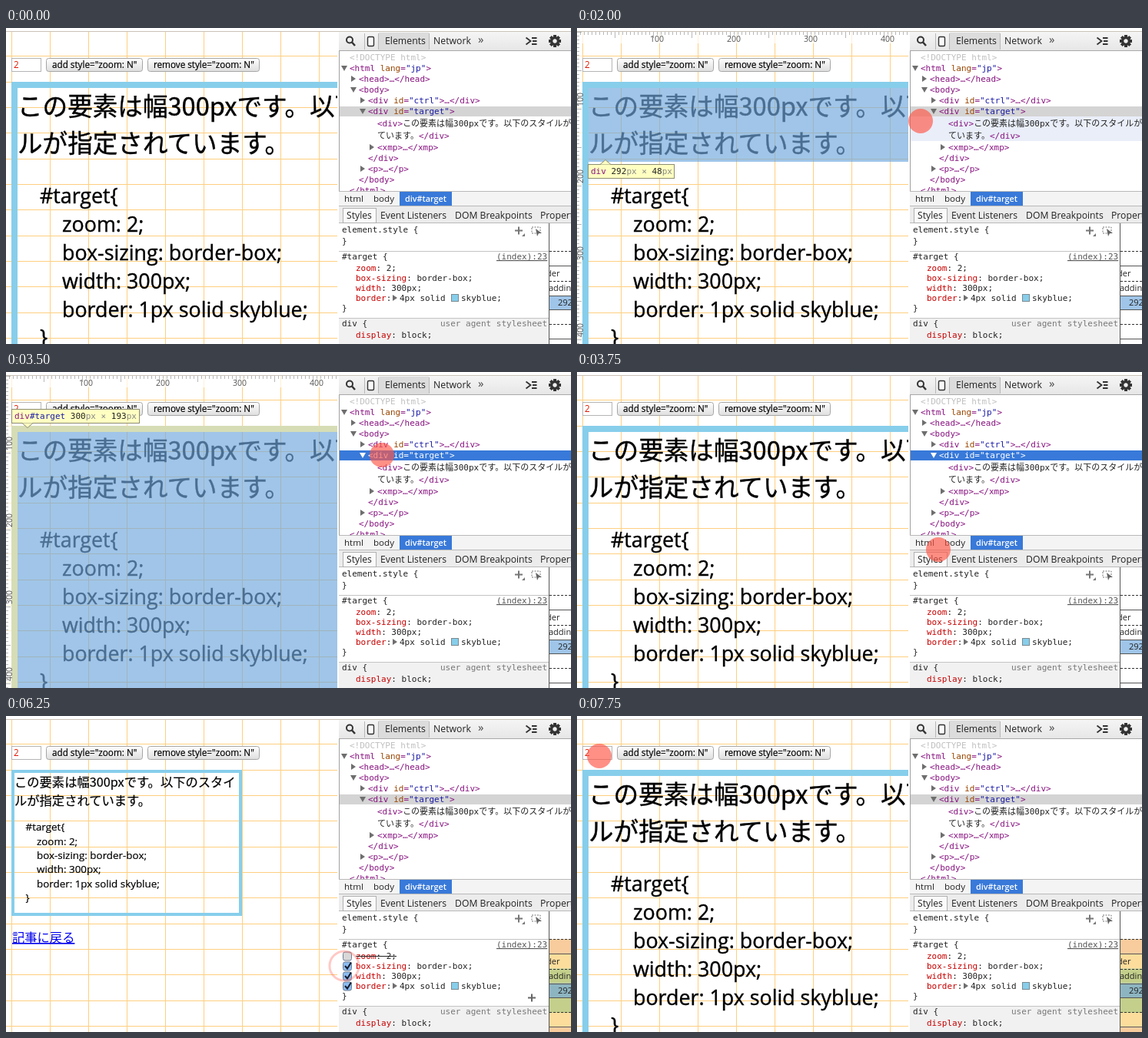
An HTML page that plays this animation: 735 px wide and 411 px high, repeating every 8000 ms.

```html
<!DOCTYPE html>
<html lang="en">
<head>
<meta charset="utf-8">
<title>Zoom inspector</title>
<style>
html, body { margin: 0; width: 100%; height: 100%; overflow: hidden; background: #fff; }
svg { display: block; }
text { white-space: pre; }
.ui { font-family: "Open Sans", "Noto Sans", sans-serif; }
.mono { font: 11px "DejaVu Sans Mono", "Noto Sans CJK JP", monospace; }
.jp { font: 16.3px "Noto Sans CJK JP", "Noto Sans CJK", sans-serif; }
#target text { stroke: #000; stroke-width: .2; }
</style>
</head>
<body>
<svg id="stage" width="735" height="411" viewBox="0 0 735 411"></svg>
<script>
const PURPLE = '#881280', BROWN = '#994500', NAVY = '#1a1aa6', RED = '#c80000', INK = '#222';
const range = (n, fn) => Array.from({ length: n }, (_, i) => fn(i)).join('');
const esc = s => s.replace(/&/g, '&amp;').replace(/</g, '&lt;').replace(/>/g, '&gt;');
const rect = (x, y, w, h, fill, more = '') =>
  `<rect x="${x}" y="${y}" width="${w}" height="${h}" fill="${fill}" ${more}/>`;
const path = (d, stroke, more = '') => `<path d="${d}" fill="none" stroke="${stroke}" ${more}/>`;
const text = (cls, x, y, s, fill = '#000', size = 0, more = '') =>
  `<text class="${cls}" x="${x}" y="${y}" fill="${fill}" ${size ? `font-size="${size}"` : ''} ${more}>${esc(s)}</text>`;
const runs = (x, y, parts) => `<text class="mono" x="${x}" y="${y}">` +
  parts.map(([s, c]) => `<tspan fill="${c}">${esc(s)}</tspan>`).join('') + '</text>';
const group = (id, body, more = '') => `<g id="${id}" ${more}>${body}</g>`;

// Syntax colours for one line of markup
const markup = (x, y, s) => runs(x, y, s.split(/(\w+(?==))|("\w+")/).filter(Boolean).map(p =>
  [p, p[0] === '"' ? NAVY : /^\w+$/.test(p) ? BROWN : PURPLE]));
const arrow = (x, y, open, fill = '#6e6e6e') =>
  `<path d="M${x} ${y}${open ? 'm-4 -3h8l-4 7z' : 'm-3 -4v8l6 -4z'}" fill="${fill}"/>`;

function button(x, w, label) {
  return rect(x + .5, 39.5, w - 1, 17, 'url(#shine)', 'rx="3" stroke="#a6a6a6"') +
    text('ui', x + 8, 52, label, '#000', 11.7, 'stroke="#000" stroke-width=".2"');
}

function page() {
  const grid = range(9, i => `M${7.5 + i * 50} 5V411`) +
    range(13, i => `M0 ${Math.round(3 + i * 33.33) + .5}H431`);
  const code = ['zoom: 2;', 'box-sizing: border-box;', 'width: 300px;', 'border: 1px solid skyblue;'];
  const target = rect(2, 2, 296, 186, 'none', 'stroke="skyblue" stroke-width="4"') +
    text('jp', 4, 22, 'この要素は幅300pxです。以下のスタイ') + text('jp', 4, 46, 'ルが指定されています。') +
    text('ui', 18.5, 79.2, '#target{', '#000', 13.4) +
    code.map((s, i) => text('ui', 33, 97.6 + i * 18.4, s, '#000', 13.4)).join('') +
    text('ui', 18.5, 171, '}', '#000', 13.4);
  return path(grid, '#ffcf80') +
    rect(7.5, 39.5, 38, 17, '#fff', 'stroke="#b5b5b5"') + text('ui', 10, 52, '2', '#e01800', 11.7) +
    button(52, 126, 'add style="zoom: N"') + button(184, 146, 'remove style="zoom: N"') +
    group('target', target) +
    group('link', text('jp', 8, 294, '記事に戻る', '#00e', 0, 'text-decoration="underline"'));
}

function rulers() {
  const ticks = range(87, i => `M${i * 5 - .5} 5v${i % 10 ? 4 : 8}`) +
    range(82, i => `M0 ${5.5 + i * 5}h${i % 10 ? 3 : 6}`);
  return rect(0, 5, 431, 15, '#fff', 'opacity=".7"') + rect(0, 20, 7, 391, '#fff', 'opacity=".7"') +
    path(ticks, '#999', 'stroke-width=".7"') +
    range(4, i => {
      const at = 100 * (i + 1);
      return text('ui', at - 5, 18, '' + at, '#555', 10.5) +
        text('ui', 0, 0, '' + at, '#555', 10.5, `transform="translate(8 ${at + 2}) rotate(-90)"`);
    });
}

function tip(x, y, w, arrowPath, parts) {
  return rect(x + .5, y + .5, w, 18, '#ffffc2', 'stroke="#8c8c70"') +
    `<path d="${arrowPath}" fill="#ffffc2" stroke="#8c8c70"/>` + runs(x + 4, y + 13, parts);
}
const size = (w, h) => [[' ' + w, INK], ['px', '#888'], [' × ', '#888'], ['' + h, INK], ['px', '#888']];
const BLUE_VEIL = 'rgba(111,168,220,.66)', GOLD_VEIL = 'rgba(255,229,153,.66)';

function overlays() {
  return group('inner', rect(15, 78, 416, 96, BLUE_VEIL)) +
    group('outer', rect(7, 70, 424, 8, GOLD_VEIL) + rect(7, 78, 8, 333, GOLD_VEIL) + rect(15, 78, 416, 333, BLUE_VEIL)) +
    group('rulers', rulers()) +
    group('innerTip', tip(14, 177, 112, 'M30 177.5l7 -6l7 6', [['div', PURPLE], ...size(292, 48)])) +
    group('outerTip', tip(7, 48, 166, 'M21 66.5l7 6l7 -6', [['div', PURPLE], ['#target', NAVY], ...size(300, 193)]));
}

function toolbar() {
  const gear = range(8, i => `<rect x="-2" y="-8" width="4" height="5" fill="#333" transform="rotate(${i * 45})"/>`);
  return rect(433, 5, 302, 25, 'url(#bar)') + rect(485, 6, 65, 23, '#dcdcdc') +
    path('M466.5 7V28M484.5 7V28M550.5 7V28', '#b8b8b8') +
    '<circle cx="447" cy="15.5" r="4" fill="none" stroke="#333" stroke-width="2"/>' +
    path('M450 18.5l4 4.5', '#333', 'stroke-width="2.5"') +
    rect(470.5, 11.5, 8, 12, '#f8f8f8', 'rx="1.5" stroke="#333" stroke-width="1.4"') +
    text('ui', 493, 21, 'Elements', INK, 12.3) + text('ui', 556, 21, 'Network', INK, 12.3) +
    text('ui', 614, 20, '»', '#444', 15) +
    path('M676.5 12.5l6 4.5l-6 4.5M684 13h6.5M685 17h5.5M684 21h6.5', '#333', 'stroke-width="1.8"') +
    `<g transform="translate(714 17)">${gear}<circle r="4.4" fill="none" stroke="#333" stroke-width="3.4"/></g>` +
    path('M433 29.5H735', '#a9a9a9');
}

function tree() {
  const tag = '<div id="target">';
  return text('mono', 447, 42, '<!DOCTYPE html>', '#c0c0c0') +
    group('rowHover', rect(434, 115, 301, 32, '#e9eef9')) +
    group('rowIdle', rect(434, 102, 301, 13, '#d4d4d4') + arrow(464, 108, true) + markup(471, 112, tag)) +
    group('rowActive', rect(434, 102, 301, 13, '#3879d9') + arrow(464, 108, true, '#fff') + text('mono', 471, 112, tag, '#fff')) +
    [[447, 56, '<html lang="jp">', 1], [459, 70, '<head>…</head>', 0], [459, 84, '<body>', 1],
     [471, 98, '<div id="ctrl">…</div>', 0], [483, 159, '<xmp>…</xmp>', 0], [471, 187, '<p>…</p>', 0]]
      .map(([x, y, s, open]) => arrow(x - 7, y - 4, open) + markup(x, y, s)).join('') +
    runs(483, 128, [['<div>', PURPLE], ['この要素は幅300pxです。以下のスタイルが指定され', INK]]) +
    runs(483, 144, [['ています。', INK], ['</div>', PURPLE]]) +
    markup(471, 173, '</div>') + markup(459, 201, '</body>') + markup(447, 215, '</html>');
}

function bars() {
  return rect(433, 212, 302, 20, '#f4f4f4') + path('M433 212.5H735M433 231.5H735', '#b9b9b9') +
    rect(512, 213, 68, 18, '#3879d9') +
    text('ui', 440, 226, 'html', INK, 11.6) + text('ui', 478, 226, 'body', INK, 11.6) +
    text('ui', 519, 226, 'div#target', '#fff', 10.8, 'font-weight="600"') +
    rect(433, 232, 302, 22, '#ececec') + path('M433 253.5H735', '#b9b9b9') +
    rect(438.5, 234.5, 43, 19, '#fafafa', 'stroke="#b0b0b0"') +
    [[443, 'Styles'], [487, 'Event Listeners'], [584, 'DOM Breakpoints'], [695, 'Properties']]
      .map(([x, s]) => text('ui', x, 248, s, INK, 12.2)).join('');
}

const check = (i, on) => rect(438.5, 307 + i * 13, 11, 11, on ? '#8cbcf0' : '#d8d8d8', 'rx="2.5" stroke="#6f7f94"') +
  (on ? path(`M441 ${312 + i * 13}l3 3.5l5 -8`, '#151c2c', 'stroke-width="2"') : '');

function styles() {
  const props = [['zoom', '2;'], ['box-sizing', 'border-box;'], ['width', '300px;']];
  const mono = (x, y, s, c = INK, more) => text('mono', x, y, s, c, 0, more);
  return rect(433, 254, 273, 157, '#fff') + rect(433, 378, 273, 33, '#f1f1f1') +
    path('M433 290.5H706M433 377.5H706', '#c4c4c4') +
    mono(437, 266, 'element.style {') + mono(437, 281, '}') +
    path('M662 263.5h10M667 258.5v10', '#777', 'stroke-width="2"') + '<path d="M675 267v4h-4z" fill="#777"/>' +
    rect(684, 259, 11, 8, 'none', 'stroke="#777" stroke-dasharray="2 1.5"') + '<path d="M689 261l8 6l-4 0l-2 4z" fill="#666"/>' +
    mono(437, 301, '#target {') + mono(638, 301, '(index):23', '#555', 'text-decoration="underline"') +
    props.map(([k, v], i) => runs(455, 316 + i * 13, [[k, RED], [': ' + v, INK]])).join('') +
    runs(455, 355, [['border', RED], [':', INK]]) + arrow(506, 351, false) + mono(512, 355, '4px solid') +
    rect(579.5, 346.5, 9, 9, 'skyblue', 'stroke="#7a8a90"') + mono(592, 355, 'skyblue;') + mono(437, 368, '}') +
    group('struck', path('M455 312.5H508', '#222')) +
    group('checks', group('zoomOn', check(0, true)) + group('zoomOff', check(0, false)) +
      range(3, i => check(i + 1, true)) + path('M679 366.5h10M684 361.5v10', '#666', 'stroke-width="2"')) +
    mono(437, 388, 'div {') + mono(565, 388, 'user agent stylesheet', '#777') +
    runs(455, 403, [['display', RED], [': block;', INK]]);
}

function boxModel() {
  const bands = ['#f9cc9d', '#fddd9b', '#c3cf8b', '#8db5c1', '#c3cf8b', '#fddd9b', '#f9cc9d'];
  return rect(706, 254, 29, 157, '#fff') + rect(707, 348, 28, 18, '#9fc5e8') +
    group('bands', bands.map((c, i) => rect(707, 290 + i * 19.2, 28, 19.3, c)).join('')) +
    path('M707 290.5H735M707 329.5H735M707 385.5H735', '#333', 'stroke-dasharray="3 2"') +
    path('M707 309.5H735M707 348.5H735M707 366.5H735M707 404.5H735', '#555') +
    text('ui', 703, 323, 'der', INK, 11) + text('ui', 706, 342, 'adding', INK, 11) +
    text('ui', 718, 361, '292', INK, 11) + rect(700, 310, 6, 18, '#fff') + path('M706.5 254V411', '#555');
}

document.getElementById('stage').innerHTML = `<defs>
  <linearGradient id="shine" x2="0" y2="1"><stop stop-color="#fff"/><stop offset="1" stop-color="#dedede"/></linearGradient>
  <linearGradient id="bar" x2="0" y2="1"><stop stop-color="#f5f5f5"/><stop offset="1" stop-color="#e6e6e6"/></linearGradient>
  <clipPath id="view"><rect y="5" width="431" height="406"/></clipPath></defs>` +
  rect(0, 0, 735, 411, '#fff') +
  group('page', page() + overlays(), 'clip-path="url(#view)"') +
  rect(431, 5, 2, 406, '#fff') + path('M433.5 5V411', '#a0a0a0') +
  tree() + toolbar() + bars() + styles() + boxModel() + path('M0 4.5H735', '#c9c2b8') +
  '<circle id="disc" r="16" fill="#ff5747" opacity=".66"/>' +
  '<circle id="ring" fill="none" stroke="#ff6a60" stroke-width="3"/>';

const $ = Object.fromEntries([...document.querySelectorAll('#stage [id]')].map(n => [n.id, n]));

// Each step changes only what it names; ring is the opacity of a pressed pointer
const steps = [
  [0, { at: null, ring: 0, hover: '', active: false, zoom: 2, checks: false, bands: false }],
  [250, { at: [24, 16] }], [500, { at: [110, 50] }], [750, { at: [230, 92] }],
  [1000, { at: [340, 135] }], [1250, { at: [412, 162] }],
  [1500, { at: [443, 135], hover: 'inner' }], [1750, { at: [446, 125] }], [2000, { at: [447, 121] }],
  [2250, { at: [489, 108], hover: 'outer' }],
  [2750, { ring: .4, active: true }], [3000, { ring: .2 }], [3250, { ring: 0 }],
  [3750, { at: [470, 231], hover: '' }], [4000, { at: [456, 274] }],
  [4250, { at: [443, 316], checks: true }], [4500, { at: [440, 325] }],
  [5000, { ring: .4, active: false }], [5250, { ring: .22 }],
  [5500, { ring: 0, zoom: 1, bands: true }],
  [6250, { ring: .36 }], [6500, { ring: .2 }], [6750, { ring: 0, zoom: 2 }],
  [7250, { at: [330, 262], checks: false }], [7500, { at: [130, 128] }], [7750, { at: [29, 52] }]
];

const show = (id, on) => { $[id].style.display = on ? '' : 'none'; };

function draw(time) {
  const s = Object.assign({}, ...steps.filter(([t]) => t <= time).map(([, change]) => change));
  const zoomed = s.zoom === 2;
  $.target.setAttribute('transform', `translate(7 70) scale(${s.zoom})`);
  for (const id of ['inner', 'outer']) { show(id, s.hover === id); show(id + 'Tip', s.hover === id); }
  show('rulers', s.hover);
  show('rowHover', s.hover === 'inner');
  show('rowIdle', !s.active);
  show('rowActive', s.active);
  show('link', !zoomed);
  show('struck', !zoomed);
  show('zoomOn', zoomed);
  show('zoomOff', !zoomed);
  show('checks', s.checks);
  show('bands', s.bands);
  show('disc', s.at && !s.ring);
  show('ring', s.at && s.ring);
  $.ring.setAttribute('opacity', s.ring);
  $.ring.setAttribute('r', 20.5 - 4 * s.ring);
  if (s.at) for (const id of ['disc', 'ring']) $[id].setAttribute('transform', `translate(${s.at})`);
}

const start = performance.now();
function tick(now) {
  draw(Math.max(0, now - start) % 8000);
  requestAnimationFrame(tick);
}
draw(0);
requestAnimationFrame(tick);
</script>
</body>
</html>
```
